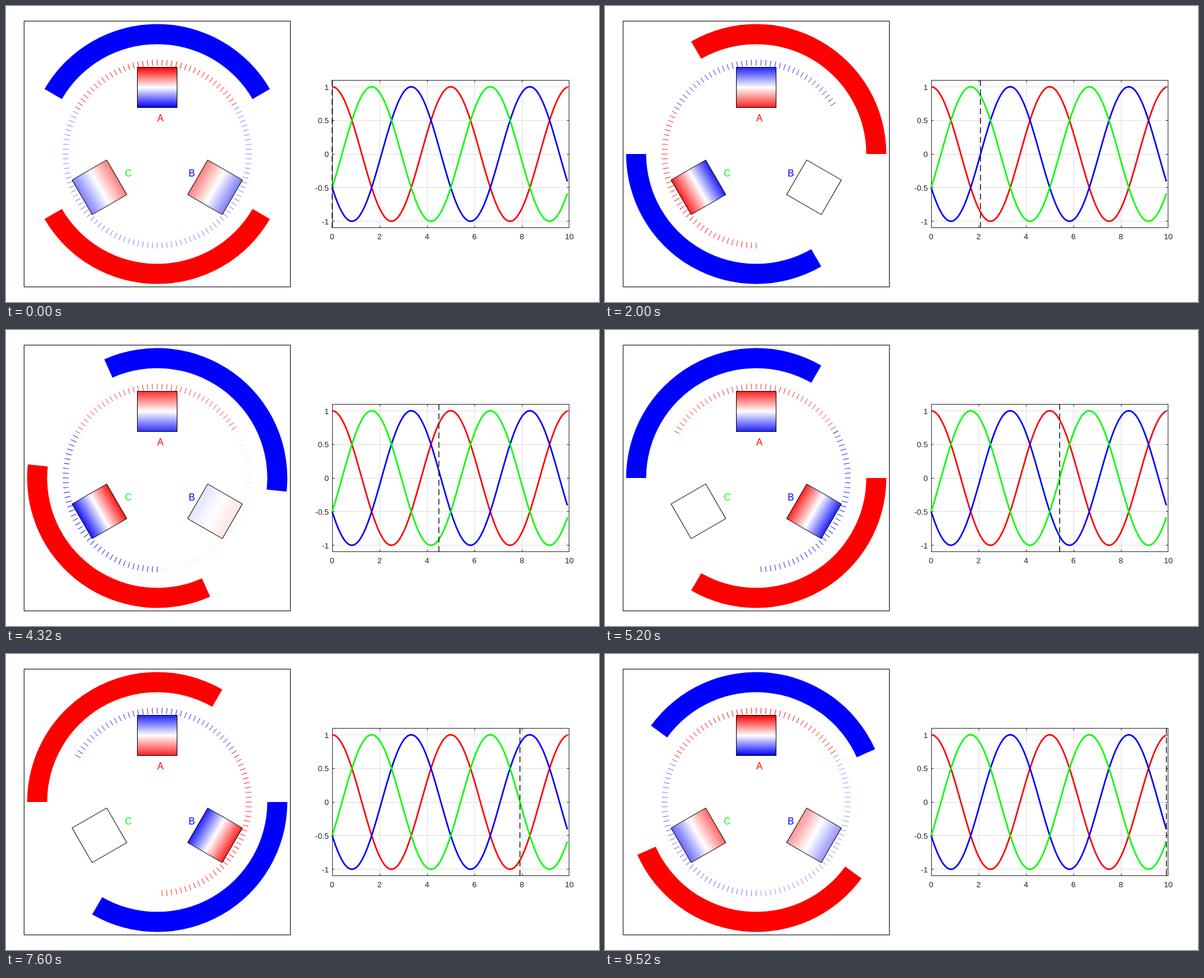
Animation, 1000 px wide and 500 px high, one loop 9600 ms. Source, as an HTML page:

```html
<!DOCTYPE html>
<html lang="en">
<head>
<meta charset="utf-8">
<title>Three-phase rotating field</title>
<style>
  html, body { margin: 0; width: 100%; height: 100%; overflow: hidden; background: #fff; }
  svg { display: block; font-family: "Liberation Sans", Arial, sans-serif; }
  .crisp { shape-rendering: crispEdges; }
</style>
</head>
<body>
<svg id="stage" width="1000" height="500" viewBox="0 0 1000 500">
  <defs>
    <linearGradient id="pos" x1="0" y1="0" x2="0" y2="1">
      <stop offset="0" stop-color="#f00"/><stop offset=".5" stop-color="#fff"/><stop offset="1" stop-color="#00f"/>
    </linearGradient>
    <linearGradient id="neg" x1="0" y1="0" x2="0" y2="1">
      <stop offset="0" stop-color="#00f"/><stop offset=".5" stop-color="#fff"/><stop offset="1" stop-color="#f00"/>
    </linearGradient>
  </defs>
</svg>
<script>
const STEP = 80, COUNT = 120, DEG = 6;
const CX = 255, CY = 250, INK = '#262626';
const stage = document.getElementById('stage');
const phases = [
  { name: 'A', color: '#f00', turn: 0, lag: 0, label: [255, 195] },
  { name: 'B', color: '#00f', turn: 120, lag: 240, label: [308, 288] },
  { name: 'C', color: '#0f0', turn: 240, lag: 120, label: [200.5, 288] }
];

const rad = d => d * Math.PI / 180;
const current = (phase, n) => Math.cos(rad(n * DEG - phase.lag));
const polar = (r, d) => `${(CX + r * Math.cos(rad(d))).toFixed(2)} ${(CY - r * Math.sin(rad(d))).toFixed(2)}`;

function add(parent, tag, attrs, text) {
  const el = document.createElementNS('http://www.w3.org/2000/svg', tag);
  for (const k in attrs) el.setAttribute(k, attrs[k]);
  if (text !== undefined) el.textContent = text;
  parent.appendChild(el);
  return el;
}

const line = (d, stroke, width = 1, extra = {}) =>
  add(stage, 'path', { d, stroke, 'stroke-width': width, fill: 'none', ...extra });
const crisp = { class: 'crisp' };

// Machine: frame, rotor poles, coils with their winding ticks
line('M30.5 25.5H479.5V474.5H30.5Z', '#000', 1, crisp);

const rotor = add(stage, 'g', {});
const R1 = 219.4, R0 = 185.6;
[['#00f', 30], ['#f00', 210]].forEach(([fill, a]) => add(rotor, 'path', {
  fill,
  d: `M${polar(R1, a)}A${R1} ${R1} 0 0 0 ${polar(R1, a + 120)}L${polar(R0, a + 120)}A${R0} ${R0} 0 0 1 ${polar(R0, a)}Z`
}));

let ticks = '';
for (let a = 33; a <= 150; a += 3) ticks += `M${polar(149.5, a)}L${polar(159.5, a)}`;

for (const p of phases) {
  const g = add(stage, 'g', { transform: `rotate(${p.turn} ${CX} ${CY})` });
  const box = { x: 221.25, y: 103.75, width: 67.5, height: 67.5 };
  p.field = add(g, 'g', {});
  p.ticks = add(p.field, 'path', { d: ticks, fill: 'none', 'stroke-width': 1 });
  p.core = add(p.field, 'rect', box);
  add(g, 'rect', { ...box, fill: 'none', stroke: '#000', ...(p.turn ? {} : crisp) });
  add(stage, 'text', { x: p.label[0], y: p.label[1], fill: p.color, 'font-size': 16 }, p.name);
}

// Chart
const px = x => 550 + 40 * x;
const py = y => 250 - y * 250 / 2.2;
const snap = v => Math.floor(v) + 0.5;
const label = (x, y, anchor, text) =>
  add(stage, 'text', { x, y, 'text-anchor': anchor, fill: INK, 'font-size': 13.33 }, text);

let grid = '', marks = '';
for (let x = 0; x <= 10; x += 2) {
  const gx = Math.min(snap(px(x)), 949.5);
  if (x > 0 && x < 10) grid += `M${gx} 125V375`;
  marks += `M${gx} 375V371M${gx} 125V129`;
  label(px(x), 394, 'middle', x);
}
for (let y = -1; y <= 1; y += 0.5) {
  const gy = snap(py(y));
  grid += `M550 ${gy}H950`;
  marks += `M550 ${gy}H554M950 ${gy}H946`;
  label(544.5, Math.round(py(y) + 5.3), 'end', y);
}
line(grid, '#dedede', 1, crisp);
line('M550.5 125.5H949.5V374.5H550.5Z' + marks, INK, 1, crisp);

for (const p of phases) {
  const pts = Array.from({ length: COUNT }, (_, n) =>
    `${px(n / 12).toFixed(2)} ${py(current(p, n)).toFixed(2)}`);
  line('M' + pts.join('L'), p.color, 2.67, { 'stroke-linejoin': 'round' });
}
const cursor = line('M0 375V125', '#000', 1.33, { 'stroke-dasharray': '10 6' });

function draw(n) {
  rotor.setAttribute('transform', `rotate(${-n * DEG} ${CX} ${CY})`);
  cursor.setAttribute('transform', `translate(${px(n / 12)} 0)`);
  for (const p of phases) {
    const v = current(p, n);
    p.field.setAttribute('opacity', Math.abs(v).toFixed(4));
    p.ticks.setAttribute('stroke', v > 0 ? '#f00' : '#00f');
    p.core.setAttribute('fill', v > 0 ? 'url(#pos)' : 'url(#neg)');
  }
}

const start = performance.now();
function tick(now) {
  draw(Math.floor(Math.max(0, now - start) / STEP) % COUNT);
  requestAnimationFrame(tick);
}
draw(0);
requestAnimationFrame(tick);
</script>
</body>
</html>
```
